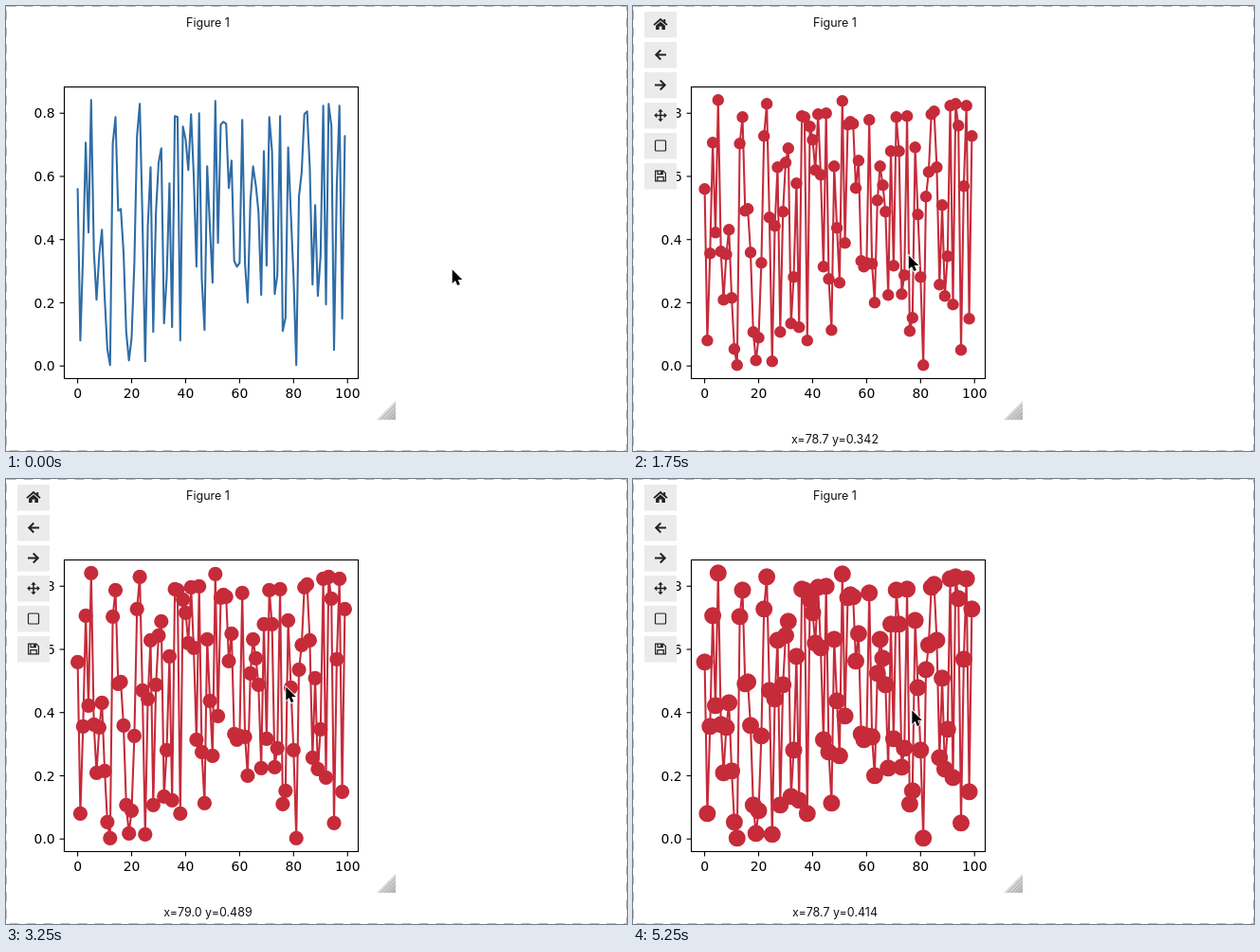
Write an HTML page that moves like this. It is 655 px wide and 470 px high and loops after 5.75 s.

```html
<!DOCTYPE html>
<html lang="en">
<head>
<meta charset="utf-8">
<title>Interactive figure</title>
<style>
  html, body { margin: 0; width: 100%; height: 100%; overflow: hidden; background: #fff; }
  svg { display: block; }
  .ui { font: 12.5px Inter, "Liberation Sans", sans-serif; text-anchor: middle; fill: #111; }
  .tick { font: 13.9px "DejaVu Sans", sans-serif; fill: #000; }
  .axes { fill: none; stroke: #000; stroke-width: 1.11; }
  #line, #dots { fill: none; stroke-linejoin: round; stroke-linecap: round; }
  #line { stroke-width: 2.08; }
  .icon path { fill: #222; }
  .icon .s { fill: none; stroke: #222; stroke-width: 1.9; }
  .icon .t { fill: none; stroke: #222; stroke-width: 1.2; }
</style>
</head>
<body>
<svg width="655" height="470" viewBox="0 0 655 470">
  <defs>
    <linearGradient id="grip" x1="0" y1="0" x2="1" y2="1">
      <stop offset=".45" stop-color="#dcdcdc"/><stop offset="1" stop-color="#b4b4b4"/>
    </linearGradient>
  </defs>
  <rect x=".5" y=".5" width="654" height="469" fill="none" stroke="#bbb" stroke-dasharray="10 8"/>
  <text class="ui" x="213" y="22">Figure 1</text>
  <path d="M391 437L411 417V437Z" fill="url(#grip)"/>
  <path d="M395 437L411 421M399 437L411 425M403 437L411 429M407 437L411 433" stroke="#a8a8a8" stroke-width=".7"/>
  <path id="line"/>
  <path id="dots" stroke="#c62b3a"/>
  <rect class="axes" x="61.5" y="85.5" width="310" height="308"/>
  <g id="ticks"></g>
  <g id="tools"></g>
  <text id="readout" class="ui" x="213" y="462"></text>
  <path id="cursor" d="M0 0V14.5L3.3 11.4 5.5 16.6 8.1 15.5 5.9 10.4H10.5Z" stroke="#fff" stroke-width="1.6" paint-order="stroke"/>
</svg>
<script>
const $ = id => document.getElementById(id);
const STEP = 250, LOOP = 5750;

const px = i => 75.6 + 2.8466 * i;
const py = v => 380.2 - 333.7 * v;

// Vertical positions of the 100 samples
const ys = [
  193, 353, 261, 144, 239, 99, 259, 310, 262, 236, 308, 362, 379, 145, 117, 216, 214, 260, 344, 374,
  350, 271, 137, 103, 223, 375, 232, 170, 344, 217, 165, 150, 335, 286, 187, 339, 116, 117, 353, 127,
  141, 173, 114, 178, 275, 113, 288, 342, 169, 234, 292, 100, 250, 125, 122, 124, 192, 163, 269, 275,
  271, 120, 272, 313, 205, 169, 189, 217, 305, 153, 274, 117, 153, 304, 284, 116, 343, 329, 149, 220,
  286, 379, 201, 175, 114, 111, 170, 294, 210, 306, 264, 105, 315, 103, 126, 363, 190, 105, 330, 137];
const points = ys.map((y, i) => `${px(i).toFixed(1)} ${y + .3}`);
$("line").setAttribute("d", "M" + points.join("L"));
$("dots").setAttribute("d", points.map(p => `M${p}h0.01`).join(""));

let ticks = "";
for (let k = 0; k <= 5; k++) {
  const x = px(k * 20);
  ticks += `<path class="axes" d="M${x} 393.5v4.9"/>
    <text class="tick" text-anchor="middle" x="${x}" y="413.8">${k * 20}</text>`;
}
for (let k = 0; k <= 4; k++) {
  const y = py(k * .2);
  ticks += `<path class="axes" d="M61.5 ${y}h-4.9"/>
    <text class="tick" text-anchor="end" x="51.7" y="${y + 5.1}">${(k * .2).toFixed(1)}</text>`;
}
$("ticks").innerHTML = ticks;

const icons = [
  `<path class="s" d="M-7 .6L0-5.4 7 .6"/><path d="M3.2-5.5H5.2V-1L3.2-2.8ZM-4.9 1.2L0-3 4.9 1.2V5.5H1.4V2H-1.4V5.5H-4.9Z"/>`,
  `<path class="s" d="M6 0H-5M.3-5L-4.8 0 .3 5"/>`,
  `<path class="s" d="M-6 0H5M-.3-5L4.8 0-.3 5"/>`,
  `<path class="s" d="M-5 0H5M0-5V5" style="stroke-width:1.5"/>
   <path d="M0-6.8L2.7-3.8H-2.7ZM0 6.8L2.7 3.8H-2.7ZM-6.8 0L-3.8-2.7V2.7ZM6.8 0L3.8-2.7V2.7Z"/>`,
  `<rect class="t" x="-5.5" y="-5.5" width="11" height="11" rx="1"/>`,
  `<path class="t" d="M-5.4-5.4H2.8L5.4-2.8V5.4H-5.4ZM-3-5.4V-1.8H2.2V-5.4M-3.2 5.4V1.2H3.2V5.4"/><path d="M0-5H2V-2.2H0Z"/>`];
$("tools").innerHTML = icons.map((icon, k) => `<g class="icon" transform="translate(29 ${19.5 + 32 * k})">
  <rect x="-17" y="-13.5" width="34" height="27.5" fill="#ebebeb"/>${icon}</g>`).join("");

// Pointer tip at every step
const path = [
  [470.4, 278], [349, 281], [329, 271], [301.2, 266.9], [301, 269], [299, 269], [294.05, 267.9], [290.5, 263],
  [287, 257], [283, 250], [277, 243], [274, 235], [267, 224.9], [295, 219], [314, 222], [321.1, 225.9],
  [322, 234], [321.95, 238.9], [302, 242], [301, 184], [299.5, 243], [294.05, 243.9]];

function draw(t) {
  const n = Math.min(Math.floor(t / STEP), path.length - 1);
  const red = n >= 7;
  const size = 8 + Math.max(0, Math.floor((Math.min(n, 17) - 9) / 2));

  $("line").setAttribute("stroke", red ? "#c62b3a" : "#2f6ca6");
  $("dots").setAttribute("visibility", red ? "visible" : "hidden");
  $("dots").setAttribute("stroke-width", (size + 1) / .72);
  $("tools").setAttribute("opacity", n < 4 ? 0 : [.15, .65][n - 4] || 1);

  const [x, y] = path[n];
  $("cursor").setAttribute("transform", `translate(${x + .3} ${y + .5})`);

  // The readout trails the pointer by one step early on
  const [rx, ry] = path[n > 0 && n < 8 ? n - 1 : n];
  $("readout").textContent = n < 4 ? "" :
    `x=${((rx - 69.9) / 2.848).toFixed(1)} y=${((382 - ry) / 333.5).toFixed(3)}`;
}

const start = performance.now();
function tick() {
  draw((performance.now() - start) % LOOP);
  requestAnimationFrame(tick);
}
tick();
</script>
</body>
</html>
```
